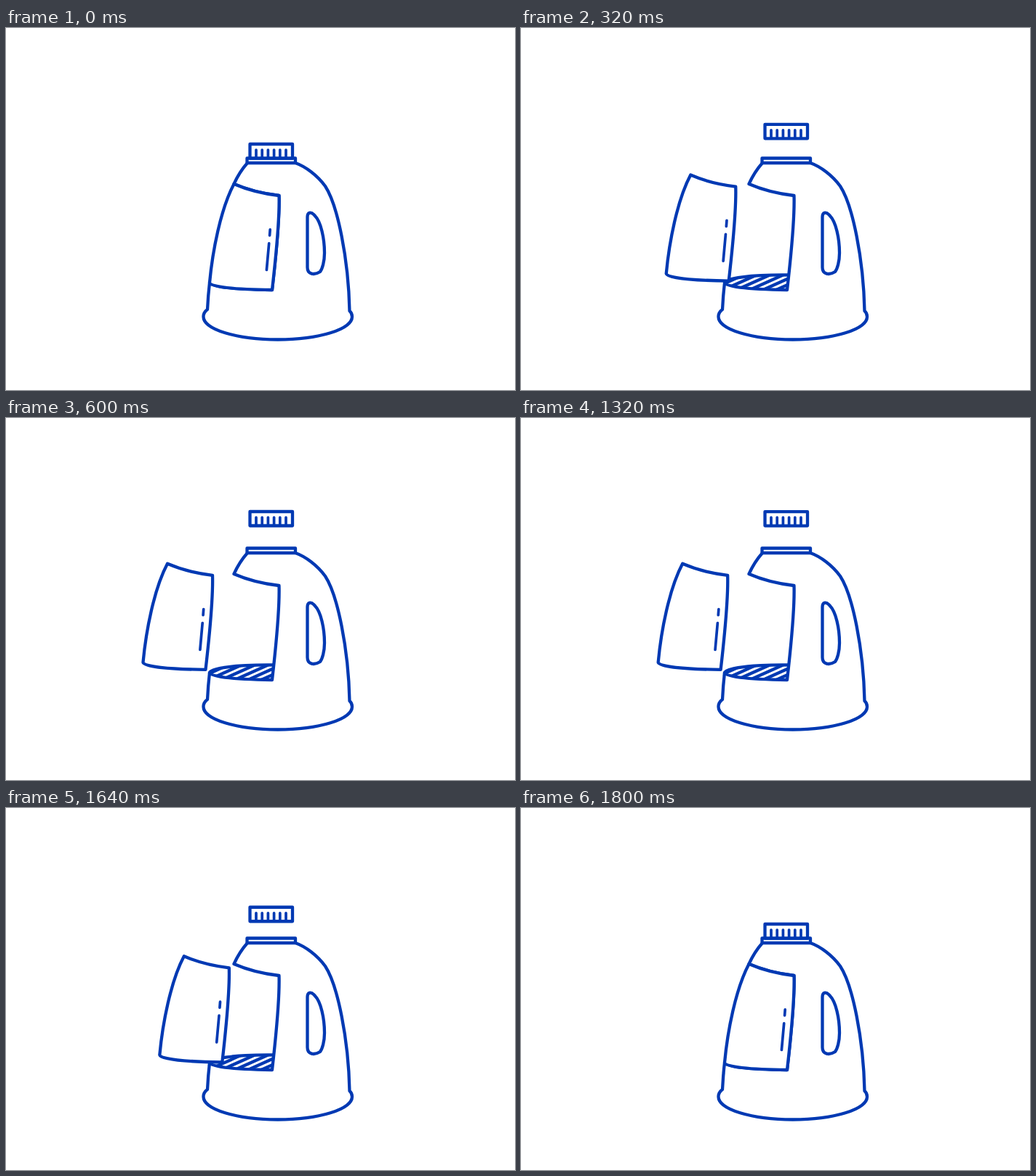
These frames come from a looping animation (700 px wide and 499 px high, 2400 ms). An HTML page:

```html
<!DOCTYPE html>
<html lang="en">
<head>
<meta charset="utf-8">
<title>Bottle</title>
<style>
  html, body { margin: 0; width: 100%; height: 100%; overflow: hidden; background: #fff; }
  svg { display: block; width: 100%; height: 100%; }
  .ink { fill: none; stroke: #0039b3; stroke-width: 4.3; stroke-linecap: round; stroke-linejoin: round; }
  .solid { fill: #fff; }
  .thin { stroke-width: 3.7; }
</style>
</head>
<body>
<svg viewBox="0 0 700 499">
  <defs>
    <clipPath id="surface">
      <path d="M280 351C281 345 315 340 368 340.5L366 361C315 360.5 281 357 280 351Z"/>
    </clipPath>
  </defs>
  <g class="ink">
    <path id="hatch" clip-path="url(#surface)"/>
    <path d="M280 351C281 345 315 340 367.5 340.5"/>
    <path d="M332 186C324 195 318 205 313.5 215Q341 227 375.5 231C376.5 262 370 326 366 361
             C315 360.5 281 357 280 351Q278 368 277 388C273 391 271.5 394 271.5 398
             A102.2 31.5 0 0 0 476 398C476 395 475 392 472.5 390
             C471 318 456 244 439 218C428 203 412 191 398 186"/>
    <path d="M414.5 261C414.5 253 420 253 425 259C433 267 438 290 438 310
             C438 322 435 332 432 336C424 341 414.5 340 414.5 330Z"/>
    <path d="M331.5 179.5H398V186H331.5Z"/>
    <g id="cap">
      <path class="solid" d="M335.5 160H394V179.5H335.5Z"/>
      <path id="ridges" class="thin"/>
    </g>
    <g id="panel">
      <path class="solid" d="M313.5 215Q341 227 375.5 231C376.5 262 370 326 366 361
               C315 360.5 281 357 280 351C284 308 295 250 313.5 215Z"/>
      <path class="thin" d="M363.2 277.8L362.6 285.8M361.7 296.8L358.4 333.5"/>
    </g>
  </g>
</svg>
<script>
  const LOOP = 2400, TICK = 40, MOVE = 520, OPEN_AT = 80, CLOSE_AT = 1280;
  const byId = id => document.getElementById(id);
  const strokes = (count, draw) => Array.from({ length: count }, (_, i) => draw(i)).join('');

  byId('hatch').setAttribute('d', strokes(6, i => `M${260 + 18.2 * i} 361l49 -22`));
  byId('ridges').setAttribute('d', strokes(6, i => `M${344 + 8.2 * i} 168V179`));

  // Same curve as cubic-bezier(.167, .167, 0, 1)
  function easeOut(x) {
    if (x <= 0) return 0;
    if (x >= 1) return 1;
    let low = 0, high = 1, s;
    for (let i = 0; i < 24; i++) {
      s = (low + high) / 2;
      if (0.5 * (1 - s) ** 2 * s + s ** 3 < x) low = s; else high = s;
    }
    return 0.5 * (1 - s) ** 2 * s + 3 * (1 - s) * s * s + s ** 3;
  }

  function openness(time) {
    return time < CLOSE_AT
      ? easeOut((time - OPEN_AT) / MOVE)
      : easeOut(1 - (time - CLOSE_AT) / MOVE);
  }

  const shift = (id, x, y) => byId(id).setAttribute('transform', `translate(${x} ${y})`);
  const start = performance.now();

  function render() {
    const elapsed = (performance.now() - start) % LOOP;
    const open = openness(Math.floor(elapsed / TICK) * TICK);
    shift('panel', -91.5 * open, -14.2 * open);
    shift('cap', 0, -31 * open);
    requestAnimationFrame(render);
  }
  render();
</script>
</body>
</html>
```
